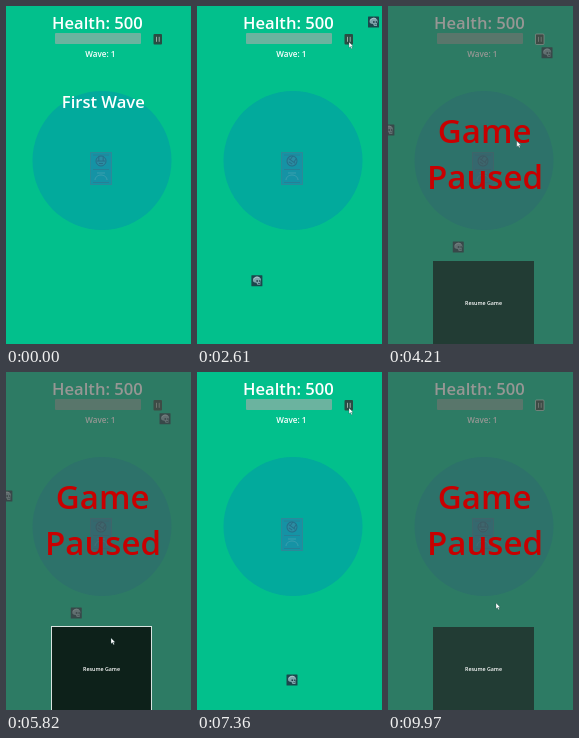
Recreate the animation shown at these times as an HTML page. Size 185x338 px, loop 10000 ms.

```html
<!DOCTYPE html>
<html lang="en">
<head>
<meta charset="utf-8">
<title>Tower defence</title>
<style>
  html, body { margin: 0; width: 100%; height: 100%; overflow: hidden; background: #02c08c; }
  svg { display: block; width: 185px; height: 338px; }
  text { font-family: "Open Sans", "Noto Sans", sans-serif; font-weight: 600; fill: #fff; text-anchor: middle; }
  .big { font-size: 16.6px; }
  .alert { font-size: 33px; fill: #c80000; }
</style>
</head>
<body>
<svg viewBox="0 0 185 338">
  <defs>
    <g id="foe">
      <rect x="-5.5" y="-5.5" width="11" height="11" rx=".5" fill="#1c464c"/>
      <path d="M-4-.5C-4-5.500 4.200-5.500 4.200-.5L3.500 1.500V4H.5L-.5 2C-3 2-4 1-4-.5Z" fill="#7fa3ab"/>
      <path d="M-3-1.500C-2-4 1-4 2.500-3" fill="none" stroke="#b4ccd0"/>
      <path d="M-.5-.6h1.600v1.500H-.5zM2.200-.6h1.300v1.500H2.200zM1.200 2.500h1.800v.6H1.200z" fill="#1c3a44"/>
    </g>
  </defs>
  <rect width="185" height="338" fill="#02c08c"/>
  <circle cx="96" cy="154.500" r="69.500" fill="#02aa9c"/>

  <g id="tower">
    <rect x="84.500" y="146.500" width="21" height="32" fill="#1593a5" stroke="#2b8a98"/>
    <path d="M87 149h16M87 163.500h16M87 176.500h16" stroke="#2b7c92" stroke-width=".8"/>
    <path d="M89 174c0-3 3-5 6-5s6 2 6 5M91 167h8" stroke="#3a9fae" fill="none"/>
    <g id="turret" fill="none" stroke="#266f88">
      <circle r="5" fill="#2a8ca2"/>
      <path d="M-2.200-4.500v4.500M2.200-4.500v4.500M-4 0h8M-2 2.500h4"/>
    </g>
  </g>

  <g id="foes"></g>
  <text class="big" x="91.400" y="23">Health: 500</text>
  <rect x="49" y="27" width="86" height="11" rx="1" fill="#6bb39f"/>
  <text x="94.300" y="51" font-size="8.100">Wave: 1</text>
  <text class="big" id="title" x="97.300" y="102">First Wave</text>
  <rect id="pause" x="147.500" y="28" width="8.500" height="10.500" rx="1" fill="#2a4c43" stroke-width=".7"/>
  <path d="M150.500 30.800v5M153.200 30.800v5" stroke="#a5b8b0" stroke-width=".9"/>

  <g id="menu">
    <rect width="185" height="338" fill="#4c4a48" fill-opacity=".58"/>
    <text class="alert" x="96.700" y="137">Game</text>
    <text class="alert" x="97" y="183">Paused</text>
    <rect id="resume" x="45" y="255" width="101" height="90"/>
    <rect id="ring" x="45.500" y="254.500" width="100" height="90" fill="none" stroke="#d8e4e0"/>
    <text x="95.500" y="299" font-size="5.300">Resume Game</text>
  </g>
  <path id="cursor" d="M0 0V5.800L1.400 4.600L2.400 6.800L3.400 6.300L2.400 4.200H4.200Z" fill="#fff" stroke="#244" stroke-width=".3"/>
</svg>
<script>
const $ = id => document.getElementById(id);
const LOOP = 10, PAUSE = 3.4, PRESS = 5.76, RESUME = 5.86, PAUSE2 = 9.25;
const GOAL = { x: 95, y: 160 }, SPEED = 45, REACH = 68;

const clamp = k => Math.min(1, Math.max(0, k));
const ease = k => (1 - Math.cos(Math.PI * clamp(k))) / 2;
const show = (el, on) => el.setAttribute('visibility', on ? 'visible' : 'hidden');
const move = (el, x, y, turn = 0) =>
  el.setAttribute('transform', `translate(${x} ${y}) rotate(${turn})`);

// A foe walks straight to the tower, from a bearing, due at a game time.
function makeFoe(bearing, due) {
  const el = document.createElementNS('http://www.w3.org/2000/svg', 'use');
  el.setAttribute('href', '#foe');
  $('foes').append(el);
  const a = bearing * Math.PI / 180;
  return { el, due, dx: Math.cos(a), dy: Math.sin(a) };
}
const foes = [makeFoe(107, 5.28), makeFoe(201, 5.64), makeFoe(-60.5, 6.29), makeFoe(90, 8.19)];

// Mouse trips: when they begin and end, and where they lead.
const entry = { x: -10, y: 176 };
const button = { x: 152, y: 36 };
const trips = [
  { from: 0.6, to: 1.3, x: 158, y: 92 },
  { from: 1.3, to: 1.8, ...button },
  { from: 3.91, to: 4.54, x: 102, y: 249 },
  { from: 5.52, to: PRESS, x: 105, y: 266 },
  { from: 6, to: 7.3, ...button },
  { from: 9.61, to: 9.97, x: 108, y: 231 }
];

function mouseAt(t) {
  let { x, y } = entry;
  for (const trip of trips) {
    const k = ease((t - trip.from) / (trip.to - trip.from));
    x += (trip.x - x) * k;
    y += (trip.y - y) * k;
  }
  return [x, y];
}

function gameTime(t) {
  if (t < RESUME) return Math.min(t, PAUSE);
  return Math.min(t, PAUSE2) - RESUME + PAUSE;
}

function draw(t) {
  const g = gameTime(t);
  const paused = t >= PAUSE && t < RESUME || t >= PAUSE2;
  const pressed = t >= PRESS && t < RESUME;
  const focus = t >= PAUSE && t < PRESS || t >= PAUSE2 - .1;

  for (const f of foes) {
    const r = SPEED * (f.due - g);
    move(f.el, GOAL.x + f.dx * r, GOAL.y + f.dy * r);
    show(f.el, r > REACH);
  }
  $('title').setAttribute('opacity', clamp(1.27 - t));
  const lean = 35 * (ease((g - 1.2) * 2) - ease((g - 6.2) * 2));
  move($('turret'), 95, 155, lean);
  move($('cursor'), ...mouseAt(t));
  $('pause').setAttribute('stroke', focus ? '#e0eeea' : 'none');
  $('resume').setAttribute('fill', pressed ? '#0d211a' : '#223c34');
  show($('menu'), paused);
  show($('ring'), paused && pressed);
}

const start = performance.now();
function tick() {
  draw((performance.now() - start) / 1000 % LOOP);
  requestAnimationFrame(tick);
}
tick();
</script>
</body>
</html>
```
